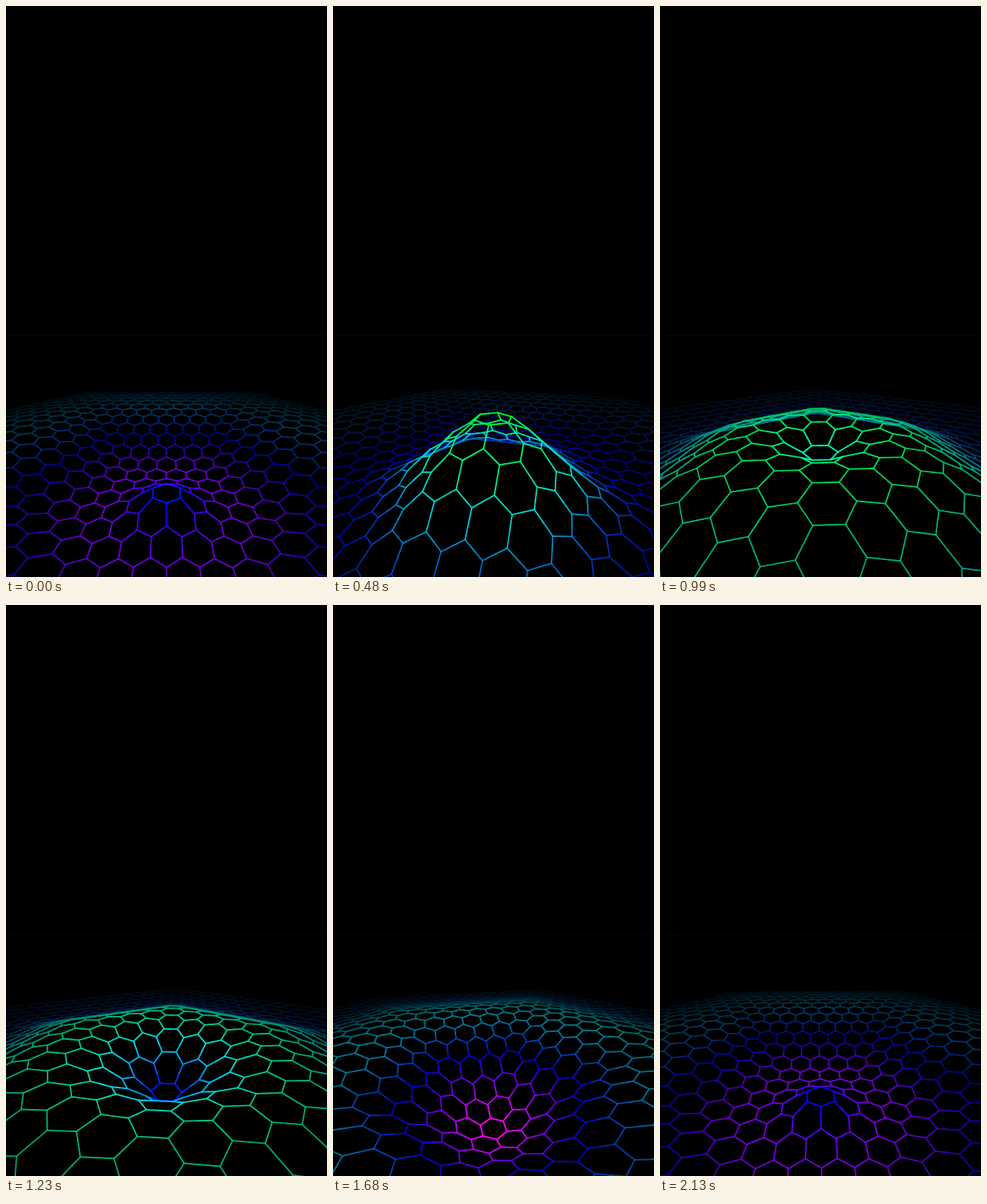
Recreate the animation shown at these times as an HTML page with a canvas. Size 417 px wide and 742 px high, loop 2.16 s.

```html
<!DOCTYPE html>
<html lang="en">
<head>
<meta charset="utf-8">
<title>Hexagon ripple</title>
<style>
html, body { margin: 0; width: 100%; height: 100%; overflow: hidden; background: #000; }
canvas { display: block; width: 417px; height: 742px; }
</style>
</head>
<body>
<canvas id="stage" width="417" height="742"></canvas>
<script>
const W = 417, H = 742;
const LOOP = 2160, STEP = 30;
const RINGS = 15, FADE_RADIUS = 13;
const RAD = Math.PI / 180;
const ctx = document.getElementById('stage').getContext('2d');

const points = [];
const edges = [];

// Distance whose contours are hexagons parallel to the patch border.
function hexDistance(x, y) {
  const u = Math.abs(x) * Math.sqrt(3) / 2, v = Math.abs(y);
  return Math.max(v, u + v / 2);
}

// Hexagonal patch of pointy-top cells with side 1, shared corners merged.
function buildGrid() {
  const pointIds = new Map();
  const edgeIds = new Set();

  function pointId(x, y) {
    const key = Math.round(x * 100) + ',' + Math.round(y * 100);
    if (!pointIds.has(key)) {
      pointIds.set(key, points.length);
      points.push({
        r: Math.hypot(x, y),
        angle: Math.atan2(y, x),
        ring: hexDistance(x, y)
      });
    }
    return pointIds.get(key);
  }

  for (let a = -RINGS; a <= RINGS; a++) {
    for (let b = -RINGS; b <= RINGS; b++) {
      if (Math.abs(a + b) > RINGS) continue;
      const cx = Math.sqrt(3) * (a + b / 2), cy = 1.5 * b;
      const ids = [];
      for (let i = 0; i < 6; i++) {
        const t = (30 + 60 * i) * RAD;
        ids.push(pointId(cx + Math.cos(t), cy + Math.sin(t)));
      }
      ids.forEach((p, i) => {
        const q = ids[(i + 1) % 6];
        const key = Math.min(p, q) + ',' + Math.max(p, q);
        if (edgeIds.has(key)) return;
        edgeIds.add(key);
        edges.push([points[p], points[q]]);
      });
    }
  }
}

// Outward wave, damped with distance from the centre.
function waveHeight(ring, phase) {
  const u = Math.max(0, ring - 1);
  return Math.cos((phase - 14 * u) * RAD) * Math.exp(-0.0758 * Math.pow(u, 1.2));
}

function project(p, turn, phase) {
  const x = p.r * Math.cos(p.angle + turn);
  const y = p.r * Math.sin(p.angle + turn);
  p.z = waveHeight(p.ring, phase);
  p.depth = 1 + 0.066 * y - 0.172 * p.z;
  p.sx = 208.5 + 21 * x / p.depth;
  p.sy = 430 + (187 - 106 * p.z) / p.depth;
}

function hidden(a, b) {
  return a.depth < 0.15 || b.depth < 0.15 ||
    Math.min(a.sy, b.sy) > H + 4 ||
    Math.max(a.sx, b.sx) < -4 || Math.min(a.sx, b.sx) > W + 4;
}

const mix = (a, b, t) => a + (b - a) * t;

// Magenta in the troughs, through blue and cyan, to green on the crests.
function colour(z, light) {
  const hue = 210 - 90 * Math.sign(z) * Math.pow(Math.abs(z), 0.85);
  return `hsl(${hue.toFixed(1)},100%,${(50 * light).toFixed(1)}%)`;
}

function drawEdge(a, b) {
  const light = Math.exp(-Math.pow((a.r + b.r) / 2 / FADE_RADIUS, 1.5));
  for (let i = 0; i < 2; i++) {
    const from = i / 2, to = from + 0.5;
    ctx.strokeStyle = colour(mix(a.z, b.z, from + 0.25), light);
    ctx.beginPath();
    ctx.moveTo(mix(a.sx, b.sx, from), mix(a.sy, b.sy, from));
    ctx.lineTo(mix(a.sx, b.sx, to), mix(a.sy, b.sy, to));
    ctx.stroke();
  }
}

function draw(ms) {
  const turn = -60 * RAD * ms / LOOP;
  const phase = 360 * (ms - 615) / LOOP;

  ctx.globalCompositeOperation = 'source-over';
  ctx.fillStyle = '#000';
  ctx.fillRect(0, 0, W, H);
  ctx.fillStyle = '#080808';
  ctx.fillRect(0, 427, 414, 1);

  ctx.globalCompositeOperation = 'lighten';
  ctx.lineCap = 'round';
  ctx.lineWidth = 1.9;
  for (const p of points) project(p, turn, phase);
  for (const [a, b] of edges) if (!hidden(a, b)) drawEdge(a, b);
}

let shown = -1;
function tick() {
  const ms = Math.floor(performance.now() % LOOP / STEP) * STEP;
  if (ms !== shown) draw(shown = ms);
  requestAnimationFrame(tick);
}

buildGrid();
tick();
</script>
</body>
</html>
```
